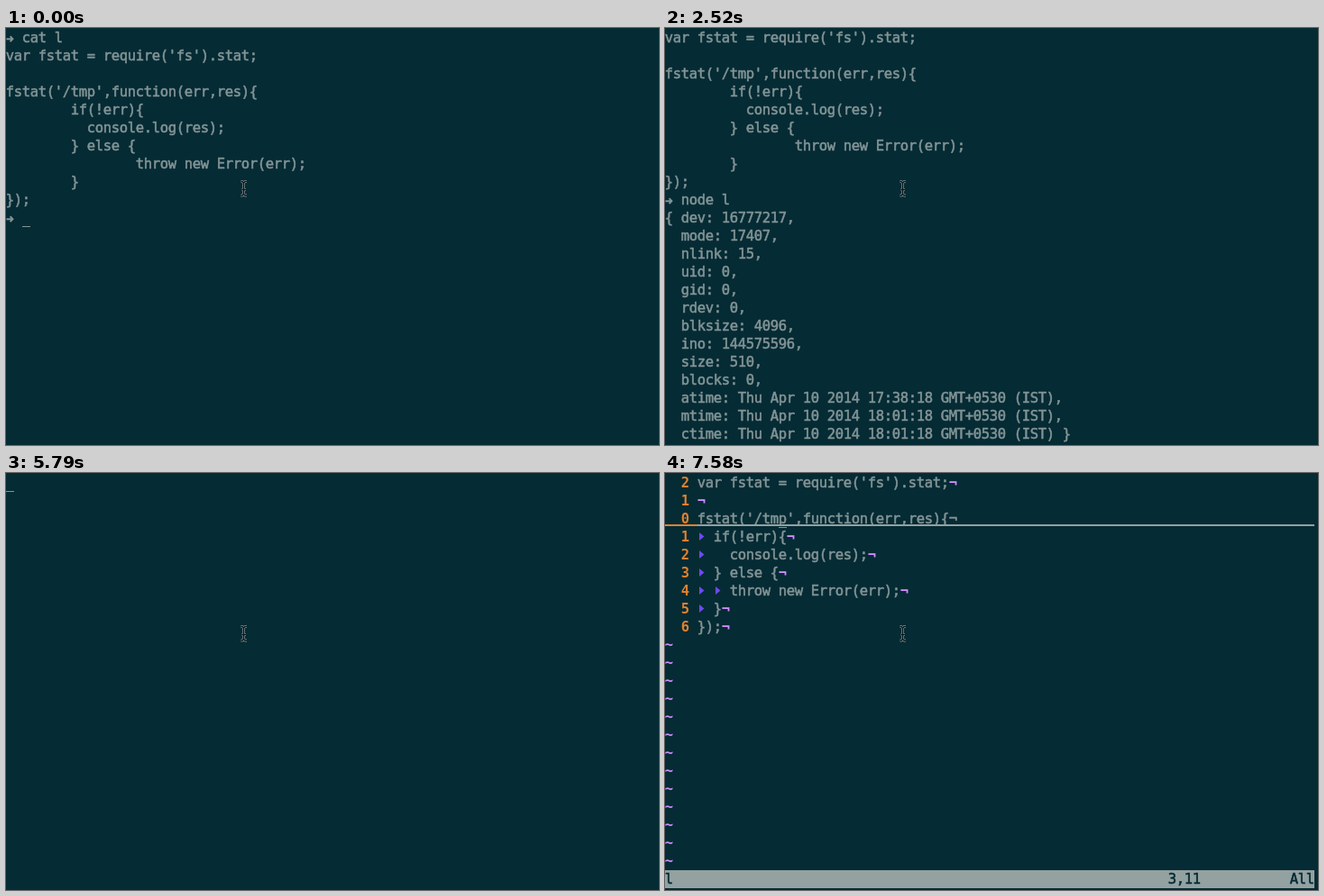
An HTML page with a canvas for the animation above (8000 ms loop, 724 px wide and 463 px high).

```html
<!DOCTYPE html>
<html lang="en">
<head>
<meta charset="utf-8">
<title>Terminal session</title>
<style>
  html, body { margin: 0; width: 100%; height: 100%; overflow: hidden; background: #052b34; }
  canvas { display: block; width: 724px; height: 463px; }
</style>
</head>
<body>
<canvas id="screen"></canvas>
<script>
const W = 724, H = 463, CELL = 9, ROW = 20, COLS = 80, LOOP = 8000;
const FONT = '15.5px "DejaVu Sans Mono", "Noto Sans Mono", monospace';
const BG = '#052b34', FG = '#839496', BAR = '#93a1a1';
const ORANGE = '#e0812f', LILAC = '#cf8cff', VIOLET = '#6d48ff', OLIVE = '#7d8d74';

const canvas = document.getElementById('screen');
const ctx = canvas.getContext('2d');
const dpr = window.devicePixelRatio || 1;
canvas.width = Math.round(W * dpr);
canvas.height = Math.round(H * dpr);
ctx.scale(dpr, dpr);
ctx.textAlign = 'center';

const code = [
  "var fstat = require('fs').stat;",
  '',
  "fstat('/tmp',function(err,res){",
  '\tif(!err){',
  '\t  console.log(res);',
  '\t} else {',
  '\t\tthrow new Error(err);',
  '\t}',
  '});'
];
const listing = code.map(s => s.replace(/\t/g, '        '));
const stats = [
  '{ dev: 16777217,', '  mode: 17407,', '  nlink: 15,', '  uid: 0,', '  gid: 0,',
  '  rdev: 0,', '  blksize: 4096,', '  ino: 144575596,', '  size: 510,', '  blocks: 0,',
  '  atime: Thu Apr 10 2014 17:38:18 GMT+0530 (IST),',
  '  mtime: Thu Apr 10 2014 18:01:18 GMT+0530 (IST),',
  '  ctime: Thu Apr 10 2014 18:01:18 GMT+0530 (IST) }'
];

function rect(x, y, w, h, color) {
  ctx.fillStyle = color;
  ctx.fillRect(x, y, w, h);
}

function arrow(x, y) {
  ctx.lineWidth = 1.9;
  ctx.beginPath();
  ctx.moveTo(x + 0.5, y + 12.2);
  ctx.lineTo(x + 7.5, y + 12.2);
  ctx.moveTo(x + 4.6, y + 9.2);
  ctx.lineTo(x + 7.6, y + 12.2);
  ctx.lineTo(x + 4.6, y + 15.2);
  ctx.stroke();
}

// One glyph per terminal cell; a hairline stroke gives regular text its medium weight
function print(text, col, row, color = FG, bold = false) {
  ctx.font = (bold ? 'bold ' : '') + FONT;
  ctx.fillStyle = ctx.strokeStyle = color;
  ctx.lineJoin = 'round';
  [...text].forEach((ch, i) => {
    const x = (col + i) * CELL, y = row * ROW;
    if (ch === ' ') return;
    if (ch === '→') return arrow(x, y);
    ctx.fillText(ch, x + CELL / 2, y + 16);
    if (!bold) {
      ctx.lineWidth = 0.55;
      ctx.strokeText(ch, x + CELL / 2, y + 16);
    }
  });
}

function cursor(col, row) {
  rect(col * CELL, (row + 1) * ROW, CELL, 1, FG);
}

function shell(lines, at) {
  lines.forEach((s, i) => print(s, 0, i));
  if (at) cursor(...at);
}

function marker(col, row, color) {
  const x = col * CELL + 2, y = row * ROW + 10.5;
  ctx.fillStyle = color;
  ctx.beginPath();
  ctx.moveTo(x, y - 4.5);
  ctx.lineTo(x + 5.5, y);
  ctx.lineTo(x, y + 4.5);
  ctx.fill();
}

function editor(line, col) {
  const cur = line - 1;
  code.forEach((s, row) => {
    const here = row === cur;
    const body = s.replace(/\t/g, '  ');
    print(String(Math.abs(row - cur)), 2, row, ORANGE, true);
    for (let i = 0; s[i] === '\t'; i++) marker(4 + 2 * i, row, here ? OLIVE : VIOLET);
    print(body, 4, row);
    print('¬', 4 + body.length, row, here ? FG : LILAC, !here);
  });
  const y = cur * ROW + 17;
  rect(0, y, COLS * CELL, 3, BG);
  rect(0, y, 4 * CELL, 2, ORANGE);
  rect(4 * CELL, y, (COLS - 4) * CELL, 2, BAR);

  for (let row = code.length; row < 22; row++) print('~', 0, row, LILAC, true);
  rect(0, 441, COLS * CELL, ROW, BAR);
  print('l', 0, 22, BG);
  print(line + ',' + (code[cur] ? col : '0-1'), 62, 22, BG);
  print('All', 77, 22, BG);
  cursor(3 + col, cur);
}

function pointer() {
  const beam = new Path2D('M260.5 170.5H262L263.5 172L265 170.5H267M263.5 172V185' +
    'M260.5 186H262L263.5 184.5L265 186H267M261.5 179.5H266');
  ctx.strokeStyle = '#8b9698';
  ctx.lineWidth = 2.8;
  ctx.stroke(beam);
  ctx.strokeStyle = '#04161b';
  ctx.lineWidth = 1.4;
  ctx.stroke(beam);
}

const before = ['→ cat l', ...listing];
const run = (typed, at = [2 + typed.length, 10]) => () => shell([...before, '→ ' + typed], at);
const open = (typed, at = [2 + typed.length, 0]) => () => shell(['→ ' + typed], at);
const edit = (line, col) => () => editor(line, col);

const scenes = [
  [0, run('')],
  [890, run('n')],
  [1040, run('no')],
  [1180, run('node')],
  [1330, run('node ')],
  [1630, run('node l')],
  [2070, run('node l', null)],
  [2220, run('node l', [0, 11])],
  [2520, () => shell([...listing, '→ node l', ...stats])],
  [3860, open('')],
  [4910, open('vi')],
  [5050, open('vi ')],
  [5200, open('vi l')],
  [5650, open('vi l', null)],
  [5790, () => cursor(0, 0)],
  [5940, edit(1, 1)],
  [6240, edit(2, 1)],
  [6390, edit(3, 1)],
  [6540, edit(4, 1)],
  [6830, edit(3, 1)],
  [7130, edit(3, 2)],
  [7430, edit(3, 9)],
  [7580, edit(3, 11)]
];

function draw(now) {
  const t = now % LOOP;
  rect(0, 0, W, H, BG);
  scenes.filter(s => s[0] <= t).pop()[1]();
  pointer();
}

const start = performance.now();
function tick() {
  draw(performance.now() - start);
  requestAnimationFrame(tick);
}
tick();
</script>
</body>
</html>
```
